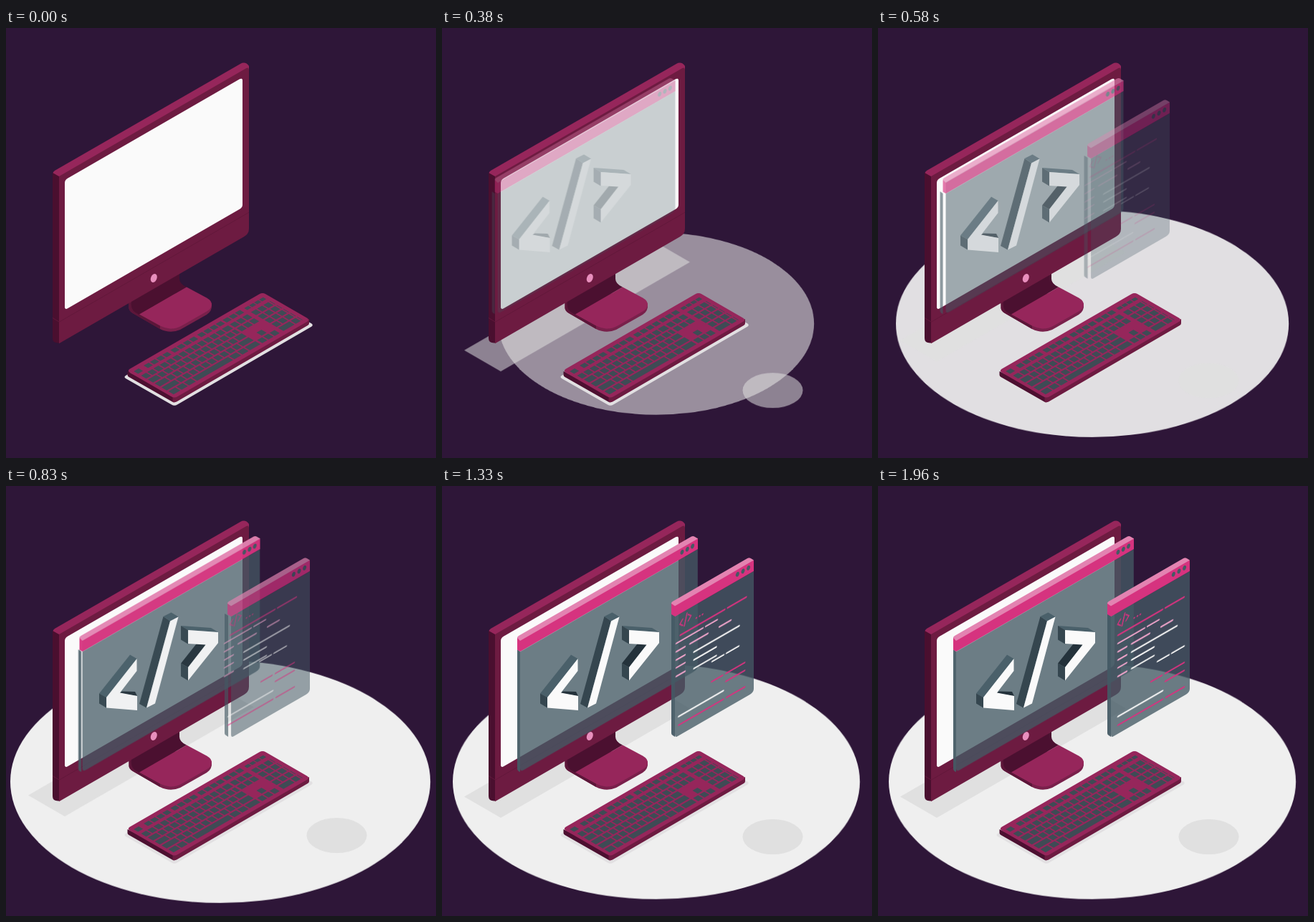
An HTML page without scripts that plays this animation: 600x600 px, repeating every 2000 ms.

```html
<!DOCTYPE html>
<html lang="en">
<head>
<meta charset="utf-8">
<title>Isometric code workstation</title>
<style>
  html, body { margin: 0; width: 100%; height: 100%; overflow: hidden; background: #2e1638; }
  svg { display: block; width: 100%; height: 100%; }
  .a { animation: 2s linear infinite both; }

  .floor { transform-origin: 299px 412.5px; animation-name: floor; }
  .shade { animation-name: shade; }
  .win { animation-name: win; }
  .show { animation-name: show; }
  .winside { animation-name: winside; }
  .sign { animation-name: sign; }
  .doc { animation-name: doc; }
  .docside { animation-name: docside; }
  .ink { animation-name: ink; }
  .lead { animation-name: lead; }
  .tags { animation-name: tags; }
  .late { animation-name: late; }
  .foot { animation-name: foot; }

  .keys { stroke: #3f4b55; stroke-width: 8.4; fill: none; stroke-dasharray: 8 2; }
  .code { fill: none; stroke-width: 2.3; stroke-linecap: round; }
  .hot { stroke: #d6337f; }
  .soft { stroke: #eda3c9; }
  .pale { stroke: #f2f2f2; }
  .glass { fill: #455a64; fill-opacity: .78; }
  .edge { fill: #455a64; fill-opacity: .94; }
  .bar { fill: #d6337f; }
  .lip { fill: #e383b1; }
  .top { fill: #4a606a; }
  .side { fill: #35464f; }
  .deep { fill: #24323b; }
  .face { fill: #fafafa; }

  @keyframes floor {
    0%, 2% { transform: scale(.47); opacity: 0; }
    12.5% { transform: scale(.641); opacity: .29; }
    23% { transform: scale(.856); opacity: .72; }
    29% { transform: scale(.965); opacity: .93; }
    32% { opacity: 1; }
    35% { transform: scale(1.02); }
    41.5% { transform: scale(1.032); }
    48% { transform: scale(1.018); }
    54%, 100% { transform: none; opacity: 1; }
  }
  @keyframes shade {
    0%, 2% { transform: translateY(38px); opacity: 0; }
    12.5% { transform: translateY(25.5px); opacity: .27; }
    23% { transform: translateY(10.5px); opacity: .7; }
    29% { transform: translateY(2.5px); opacity: .93; }
    32% { opacity: 1; }
    35% { transform: translateY(-1.3px); }
    41.5% { transform: translateY(-2px); }
    54%, 100% { transform: none; opacity: 1; }
  }
  @keyframes win {
    0%, 4% { transform: translateX(-49px); }
    12.5% { transform: translateX(-41px); }
    23% { transform: translateX(-25.5px); }
    29% { transform: translateX(-14.5px); }
    35% { transform: translateX(-7px); }
    41.5% { transform: translateX(-2.5px); }
    50%, 100% { transform: none; }
  }
  @keyframes show {
    0%, 4% { opacity: 0; }
    12.5% { opacity: .17; }
    23% { opacity: .45; }
    29% { opacity: .64; }
    41.5% { opacity: .95; }
    50%, 100% { opacity: 1; }
  }
  @keyframes winside {
    0%, 29% { transform: translateX(-4px); }
    41.5% { transform: translateX(-1.5px); }
    54%, 100% { transform: none; }
  }
  @keyframes sign {
    0%, 6% { transform: translateX(-60px); opacity: 0; }
    12.5% { transform: translateX(-51px); opacity: .06; }
    23% { transform: translateX(-32.5px); opacity: .35; }
    29% { transform: translateX(-22px); opacity: .6; }
    41.5% { transform: translateX(-7px); opacity: .93; }
    50% { transform: translateX(-2px); opacity: 1; }
    60%, 100% { transform: none; opacity: 1; }
  }
  @keyframes doc {
    0%, 19% { transform: translateX(-44px); opacity: 0; }
    23% { transform: translateX(-39px); opacity: .15; }
    29% { transform: translateX(-28px); opacity: .39; }
    41.5% { transform: translateX(-11px); opacity: .68; }
    54% { transform: translateX(-2px); opacity: .92; }
    61%, 100% { transform: none; opacity: 1; }
  }
  @keyframes docside {
    0%, 29% { transform: translateX(-4.5px); }
    41.5% { transform: translateX(-4px); }
    60%, 100% { transform: none; }
  }
  @keyframes ink {
    0%, 24% { opacity: 0; }
    29% { opacity: .15; }
    41.5% { opacity: .52; }
    54% { opacity: .85; }
    64%, 100% { opacity: 1; }
  }
  @keyframes lead {
    0%, 24% { transform: translateX(-46px); }
    29% { transform: translateX(-39px); }
    41.5% { transform: translateX(-22px); }
    54% { transform: translateX(-9px); }
    66.5% { transform: translateX(-2.5px); }
    82%, 100% { transform: none; }
  }
  @keyframes tags {
    0%, 24% { transform: translateX(-52px); }
    29% { transform: translateX(-46px); }
    41.5% { transform: translateX(-30px); }
    54% { transform: translateX(-17px); }
    66.5% { transform: translateX(-8px); }
    82% { transform: translateX(-2px); }
    97%, 100% { transform: none; }
  }
  @keyframes late {
    0%, 29% { transform: translateX(-50px); }
    41.5% { transform: translateX(-36px); }
    54% { transform: translateX(-23px); }
    66.5% { transform: translateX(-13px); }
    82% { transform: translateX(-3.5px); }
    97%, 100% { transform: none; }
  }
  @keyframes foot {
    0%, 29% { transform: translateX(-42px); }
    41.5% { transform: translateX(-25px); }
    54% { transform: translateX(-12px); }
    66.5% { transform: translateX(-4.7px); }
    82%, 100% { transform: none; }
  }
</style>
</head>
<body>
<svg viewBox="0 0 600 600">
  <rect width="600" height="600" fill="#2e1638"/>

  <ellipse class="a floor" cx="299" cy="412.5" rx="284" ry="164" fill="#efefef"/>
  <g class="a shade" fill="#e0e0e0">
    <path d="M31 433.500L82 463 346 310.500 295 281z"/>
    <ellipse cx="461.500" cy="489.500" rx="42" ry="24.500"/>
  </g>
  <path d="M167 485L358 375 426.500 412.500Q429 414.500 426.500 416.500L239 525.500Q235 528 231 525.500L167 489Q164 487 167 485z" fill="#e2e0e2"/>

  <!-- stand -->
  <path d="M171.500 380V391Q172 395 177 398L215 420Q229 427 243 421L280 400Q288 395 287 385L240 370z" fill="#79204b"/>
  <path d="M171.500 380V391Q172 395 177 398L215 420V415L186 399z" fill="#5c1639"/>
  <path d="M174 380L242 340V350Q242 357 252 361.500L186 400Q175 395 175 388z" fill="#4b1030"/>
  <path d="M186 399.500L252 361.500 280 376.500Q288 381 287 387 286 392 280 395.500L246 415Q237 420 229 419.500 222 419 215 415.500z" fill="#96265b"/>

  <!-- monitor -->
  <path d="M65 204Q65 201 68 199L327 50Q334 46 339 53V60L74 210z" fill="#96265b"/>
  <path d="M65 202L74 207V439.500Q65 440 65 433z" fill="#4a0f2f"/>
  <g transform="skewY(-30)">
    <path d="M74 249.700H335Q339 249.700 339 255V476Q339 483 332 483H74z" fill="#6d1b41"/>
    <path d="M74 453H339" stroke="#5f1739" stroke-width=".7"/>
    <rect x="82" y="259.500" width="248" height="181.500" rx="4" fill="#fafafa"/>
  </g>
  <path d="M65 404.500L74 410" stroke="#6d1b41" stroke-width=".7"/>
  <ellipse cx="206.300" cy="349" rx="4.200" ry="6.200" transform="rotate(22 206.300 349)" fill="#e88fbd"/>

  <!-- keyboard -->
  <path d="M169.500 479V484Q169.500 486 171.500 487L232 521.500Q235 523 235 522V512z" fill="#4d1031"/>
  <path d="M423 406V412Q423 414 421 415L238 521.500Q235 523 232.500 521.500V512z" fill="#6d1b41"/>
  <g transform="matrix(.866 -.5 .866 .5 170 478.300)">
    <rect x="-1" y="-1" width="219" height="77" rx="5" fill="#96265b"/>
    <g class="keys">
      <g stroke-width="7">
        <path d="M4 9h9M20 9h38M63 9h38M106 9h38M147 9h28"/>
        <path d="M181 9h31" stroke-width="5" stroke-dasharray="6.500 1.500"/>
      </g>
      <path d="M4 21.500h128M147 21.500h28M181 21.500h31"/>
      <path d="M19 32.500h125M147 32.500h28M181 32.500h31"/>
      <path d="M22 43.500h108M181 43.500h31"/>
      <path d="M27 54.500h98M157 54.500h8M181 54.500h31"/>
      <path d="M147 65.500h28M201 65.500h11"/>
      <g stroke-dasharray="none">
        <path d="M134 21.500h10M4 32.500h13M4 43.500h16M132 43.500h12M4 54.500h21M127 54.500h17M181 65.500h18"/>
        <path d="M4 65.500h11M17 65.500h10M29 65.500h11M42 65.500h58M102 65.500h11M115 65.500h10M127 65.500h17"/>
      </g>
    </g>
  </g>

  <!-- main window -->
  <g class="a win">
    <g class="a show">
      <path class="a winside edge" d="M105 228L109 231V399Q105 398 105 394z"/>
      <g transform="skewY(-30)">
        <path class="glass" d="M109 294H357V456Q357 462 351 462H114Q109 462 109 457z"/>
        <path d="M109 278H357V294H109z" fill="#455a64" fill-opacity=".35"/>
      </g>
    </g>
    <g class="a show">
      <path class="bar" d="M109 214L355 72.900Q357 72.500 357 74V88L109 231 105 228.500V211z"/>
      <path class="lip" d="M105 212Q105 210 107 209L348 70.500Q350.500 69.500 353 71L357 73.500 109 216z"/>
      <g fill="#455a64">
        <ellipse cx="335" cy="92.300" rx="2.200" ry="3.600" transform="rotate(20 335 92.300)"/>
        <ellipse cx="342.300" cy="88.200" rx="2.200" ry="3.600" transform="rotate(20 342.300 88.200)"/>
        <ellipse cx="349.600" cy="84" rx="2.200" ry="3.600" transform="rotate(20 349.600 84)"/>
      </g>
    </g>
  </g>

  <g class="a sign">
    <path class="top" d="M137 289.500L180 235.500 189.500 241 147 295z"/>
    <path class="side" d="M137 289.500L147 295V309.500L137 303.500z"/>
    <path class="deep" d="M165 289L169 286.500 187 287 190 293z"/>
    <path class="face" d="M147 295L189.500 241V258L166 288.500 190 293V313L147 309.500z"/>

    <path class="side" d="M193 304L226.500 182 236 188.500 203 309.500z"/>
    <path class="top" d="M226.500 182L237.500 176.500 247.500 182.500 236 188.500z"/>
    <path class="face" d="M203 309.500L236 188.500 247.500 182.500 215 303.500z"/>

    <path class="top" d="M251 195L293 198 303 204 261 201z"/>
    <path class="side" d="M251 195L261 201V220.500L251 214.500z"/>
    <path class="deep" d="M251 247.500L274 218.500 286 221 261 253z"/>
    <path class="side" d="M251 247.500L261 253V271.500L251 265.500z"/>
    <path class="face" d="M261 201L303 204V219L261 271.500V253L285.500 221.500 261 220z"/>
  </g>

  <!-- code window -->
  <g class="a doc">
    <path class="a docside edge" d="M320 178L325 181V350L322 348Q320 347 320 345z"/>
    <g transform="skewY(-30)">
      <path class="glass" d="M325 370H435V534Q435 539 430 539H329Q325 539 325 535z"/>
      <path class="bar" d="M325 354H433Q435 354 435 356V370H325z"/>
    </g>
    <path class="bar" d="M320 163L325 166V182L320 179z"/>
    <path class="lip" d="M320 164Q320 162 322 161L426 101Q428.500 99.500 431 101L435 103.500 325 167.500z"/>
    <g fill="#455a64">
      <ellipse cx="412.300" cy="123.200" rx="2.200" ry="3.600" transform="rotate(20 412.300 123.200)"/>
      <ellipse cx="420" cy="118.800" rx="2.200" ry="3.600" transform="rotate(20 420 118.800)"/>
      <ellipse cx="427.600" cy="114.300" rx="2.200" ry="3.600" transform="rotate(20 427.600 114.300)"/>
    </g>
  </g>

  <!-- code lines slide level, so each skew sits inside its moving group -->
  <g class="a ink code">
    <g class="a lead"><g transform="skewY(-30)">
      <path class="hot" stroke-width="1.600" d="M338.500 381l-4 5 4 4M344.500 376l-4 16M346 379l4 4-4 5"/>
      <path class="hot" d="M357.500 390.500h.1M362 390.500h.1M366 390.500h.1"/>
      <path class="hot" d="M335 401.500H397M401 401.500H427"/>
      <path class="pale" d="M354 436H417M354 447H385M354 459H385"/>
    </g></g>
    <g class="a tags soft"><g transform="skewY(-30)">
      <path d="M335 413H372M376 413H392"/>
      <path d="M335 424.500H347M354 424.500H379M395 424.500H411"/>
      <path d="M335 436H347M335 447H347M335 459H347"/>
    </g></g>
    <g class="a late pale"><g transform="skewY(-30)">
      <path d="M390 470H406M410 470H427"/>
    </g></g>
    <g class="a foot"><g transform="skewY(-30)">
      <path class="hot" d="M381 493H396M401 493H427M401 504H427"/>
      <path class="pale" d="M335 515H397"/>
      <path class="hot" d="M335 527H397M402 527H427"/>
    </g></g>
  </g>
</svg>
</body>
</html>
```
